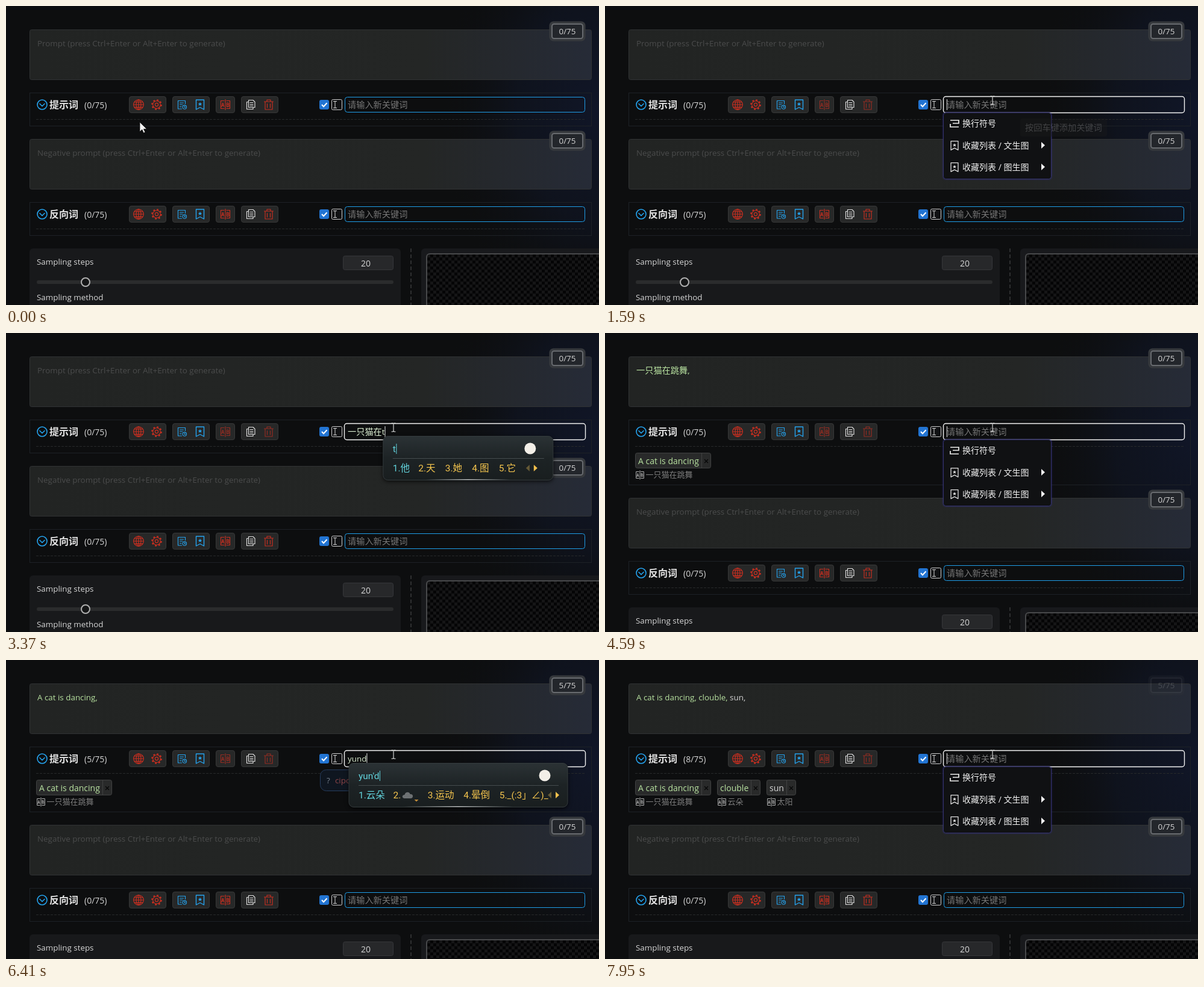
An HTML page for the animation above (8 s loop, 984 by 497 pixels).

```html
<!DOCTYPE html>
<html lang="zh">
<head>
<meta charset="utf-8">
<title>Prompt editor</title>
<style>
html,body{margin:0;width:100%;height:100%;overflow:hidden;background:#0d0e0f}
svg{display:block;width:984px;height:497px}
text{font:13.4px "Open Sans","Noto Sans CJK SC","Noto Sans CJK",sans-serif;fill:#d6d6d6;white-space:pre}
.c{font-size:14.2px;font-family:"Noto Sans CJK SC","Noto Sans CJK",sans-serif}
.hint{fill:#4b4c4c}
.head{font:700 16px "Noto Sans CJK SC","Noto Sans CJK",sans-serif;fill:#e4e4e4}
.n14{font-size:14px}
.mid{text-anchor:middle}
.ph{fill:#777}
.menu{font:14px "Open Sans","Noto Sans CJK SC","Noto Sans CJK",sans-serif;fill:#f2f2f2}
.small{font:13px "Noto Sans CJK SC","Noto Sans CJK",sans-serif;fill:#7d7d7d}
.green,.green .c{fill:#b9e3a1}
.entry,.entry .c{fill:#dcefd2}
.ime{font:15.5px Roboto,"Noto Sans CJK SC","Noto Sans CJK",sans-serif;fill:#f6c64e}
.pin{font:15.4px Roboto,sans-serif;fill:#63d6df}
.area{fill:url(#area);stroke:#313334}
.row{fill:none;stroke:#1d2126}
.dash{stroke:#27292a;stroke-dasharray:4 2}
.btn{fill:#272828;stroke:#373838}
.i{fill:none;stroke:currentColor;stroke-width:1.15;stroke-linejoin:round;stroke-linecap:round}
.red{color:#cb2f20}.blue{color:#25a3ee}.white{color:#dedede}
.dim{opacity:.68}
.off{display:none}
</style>
</head>
<body>
<svg viewBox="0 0 984 497">
<defs>
  <radialGradient id="glow" gradientUnits="userSpaceOnUse" cx="980" cy="170" r="370" gradientTransform="translate(980 170) scale(.72 1) translate(-980 -170)">
    <stop offset="0" stop-color="#141e40" stop-opacity=".5"/><stop offset=".5" stop-color="#121b36" stop-opacity=".36"/><stop offset="1" stop-color="#0d0e0f" stop-opacity="0"/>
  </radialGradient>
  <linearGradient id="area"><stop offset="0" stop-color="#222423"/><stop offset=".7" stop-color="#242625"/><stop offset="1" stop-color="#262b37"/></linearGradient>
  <linearGradient id="glass" x2="0" y2="1"><stop offset="0" stop-color="#2b3235"/><stop offset=".5" stop-color="#1d2325"/><stop offset="1" stop-color="#191e1f"/></linearGradient>
  <linearGradient id="shine"><stop offset="0" stop-color="#fff" stop-opacity="0"/><stop offset=".5" stop-color="#fff" stop-opacity=".75"/><stop offset="1" stop-color="#fff" stop-opacity="0"/></linearGradient>
  <pattern id="check" x="699" y="413" width="10" height="10" patternUnits="userSpaceOnUse"><path fill="#050506" d="M0 0h10v10H0z"/><path fill="#151516" d="M0 0h5v5H0zM5 5h5v5H5z"/></pattern>
  <filter id="shade" x="-10%" y="-20%" width="120%" height="150%" color-interpolation-filters="sRGB"><feDropShadow dx="0" dy="2" stdDeviation="3" flood-color="#000" flood-opacity=".7"/></filter>
  <filter id="aura" x="-10%" y="-10%" width="120%" height="120%" color-interpolation-filters="sRGB"><feDropShadow dx="0" dy="0" stdDeviation="1.5" flood-color="#3b35a8" flood-opacity=".6"/></filter>

  <g id="globe" class="i"><circle r="8.3"/><ellipse rx="4" ry="8.3"/><path d="M0-8.3V8.3M-8.3 0H8.3M-7-4.3H7M-7 4.3H7"/></g>
  <g id="gear" class="i"><circle r="6.3"/><circle r="2.6"/><circle r="7.6" stroke-width="2.4" stroke-dasharray="2.7 3.27" stroke-linecap="butt"/></g>
  <g id="list" class="i"><path d="M5.500-1.500V-6.500H-6.500V7H-.5M-3.500-3H2.500M-3.500 0H1M-3.500 3.500H-1"/><circle cx="4.300" cy="4" r="3.200"/><path d="M4.300 2.500V4.300H5.500"/></g>
  <g id="mark" class="i"><path stroke-width="1.400" d="M-6.500-8H6.500V8L0 4.500-6.500 8Z"/><path d="M0-4.200 1-2H3.200L1.500-.5 2.200 1.800 0 .5-2.200 1.800-1.500-.5-3.200-2H-1Z" fill="currentColor" stroke="none"/></g>
  <g id="ab" class="i"><path d="M-2-6.500H-7.500V6.500H-2M2-6.500H7.500V6.500H2M0-8.500V8.500M-6 3.300-4.200-3-2.400 3.300M-5.500 1.500H-3M2.600-3V3.300H4.500C6.500 3.300 6.300 0 4.500 0H2.600M4.300 0C6.200 0 6-3 4.300-3H2.600"/></g>
  <g id="copy" class="i"><path d="M-3.500-7.500H4L7-4.500V4.500H-3.500ZM-3.500-4.500H-6.500V7.500H4V4.500M-1-3.500H4M-1-.5H4M-1 2H4"/></g>
  <g id="bin" class="i"><path d="M-7.500-5H7.500M-3-5V-8H3V-5M-6-5V8H6V-5M-2.500-1.500V5M2.500-1.500V5"/></g>
  <g id="badge"><rect x="901.500" y="25.500" width="60" height="33" rx="7" fill="#36393d"/><rect x="906" y="30" width="51" height="24" rx="3.500" fill="#23262b" stroke="#686b6f" stroke-width="2"/></g>
</defs>
<path fill="#0d0e0f" d="M0 0h984v497H0z"/><path fill="url(#glow)" d="M0 0h984v497H0z"/>
<g id="top"></g>
<g id="low"></g>
<g id="tags"></g>
<g id="menu">
  <rect x="561.5" y="177.500" width="179" height="110" rx="4" fill="#101113" stroke="#34336f" filter="url(#aura)"/>
  <path d="M573 190H587V195H577M587 201H573V196" fill="none" stroke="#eee" stroke-width="1.700"/>
  <text x="593" y="200" class="menu">换行符号</text>
  <use href="#mark" class="white" transform="translate(580 232) scale(.92)"/><text x="593" y="237" class="menu">收藏列表 / 文生图</text>
  <use href="#mark" class="white" transform="translate(580 268) scale(.92)"/><text x="593" y="273" class="menu">收藏列表 / 图生图</text>
  <path d="M724 226l6 5.500-6 5.500zM724 262l6 5.500-6 5.500z" fill="#f4f4f4"/>
</g>
<g id="tip" opacity="0"><rect x="689" y="187" width="144" height="30" rx="4" fill="#1b1c1d"/><text x="697" y="207" class="c" style="fill:#8d8d8d">按回车键添加关键词</text></g>
<g id="guess"><rect x="521.500" y="182.500" width="190" height="35" rx="10" fill="#0f1620" stroke="#263d5e"/><text x="532" y="205" style="fill:#79838f">?</text><text x="546" y="205" style="fill:#8f4548">cipo</text></g>
<g id="ime">
  <rect id="pane" y="171.500" height="73" rx="8" fill="url(#glass)" stroke="#343b3d" filter="url(#shade)"/>
  <path id="rule" stroke="#454c4e"/><rect id="edge" y="243" height="1.200" fill="url(#shine)"/>
  <circle id="dot" cy="192" r="9.500" fill="#f3efe8"/>
  <text id="pin" class="pin" y="198"></text><path id="pinCaret" stroke="#63d6df"/>
  <g id="cands"></g>
  <path id="prev" d="M-4 0l6-5.500v11z" fill="#665a36"/><path id="next" d="M4 0l-6-5.500v11z" fill="#f3c04c"/>
</g>
<path id="arrow" d="M0 0V16L3.800 12.400 6.300 18 9 17 6.500 11.600H11.600Z" fill="#f4f4f4" stroke="#111" stroke-width=".8"/>
<path id="beam" d="M-3.500-7H-1L0-6 1-7H3.500M0-6V6M-3.500 7H-1L0 6 1 7H3.500" fill="none" stroke="#e8e8e8" stroke-width="1.100"/>
</svg>
<script>
const $ = id => document.getElementById(id);
const rich = s => s.replace(/[\u3000-\u9fff]+/g, m => `<tspan class="c">${m}</tspan>`);
const use = (id, x, y, cls) => `<use href="#${id}" x="${x}" y="${y}" class="${cls}"/>`;
const show = (id, on) => $(id).classList.toggle('off', !on);
const set = (id, attrs) => Object.entries(attrs).forEach(([k, v]) => $(id).setAttribute(k, v));
const at = (id, x, y) => set(id, {transform: `translate(${x} ${y})`});

function section(k, title, hint) {
  const groups = [[204, 62], [276, 62], [348, 32], [390, 62]];
  return `<rect class="area" x="39.5" y="39.5" width="932" height="83" rx="3"/>
  <text id="prompt${k}" class="hint" x="52" y="67">${hint}</text>
  <g id="badge${k}"><use href="#badge"/><text id="count${k}" class="mid" x="931.500" y="47">0/75</text></g>
  <rect id="row${k}" class="row" x="39.5" y="144.500" width="932" height="55"/>
  <path class="dash" d="M50 188.500H962"/>
  <g class="i blue" style="stroke-width:1.600"><circle cx="60" cy="164" r="8"/><path d="M56 162.500l4 4 4-4"/></g>
  <text class="head" x="72" y="170">${title}</text><text id="total${k}" class="n14" x="130" y="169.500">(0/75)</text>
  ${groups.map(([x, w]) => `<rect class="btn" x="${x + .5}" y="150.500" width="${w - 1}" height="27" rx="3.500"/>`).join('')}
  ${use('globe', 220, 164, 'red')}${use('gear', 250, 164, 'red')}${use('list', 292, 164, 'blue')}${use('mark', 322, 164, 'blue')}
  <g id="ab${k}">${use('ab', 364, 164, 'red')}</g>${use('copy', 406, 164, 'white')}<g id="bin${k}">${use('bin', 436, 164, 'red')}</g>
  <rect x="520" y="156" width="16" height="16" rx="3" fill="#2274d2"/><path d="M524 164l3 3.200 5.500-6" fill="none" stroke="#fff" stroke-width="2"/>
  <rect x="540.500" y="155.500" width="17" height="17" rx="2" fill="#101113" stroke="#cfcfcf"/>
  <path d="M543 158.500H549M546 158.500V169.500M543 169.500H549" stroke="#d8d8d8" fill="none"/>
  <rect id="box${k}" x="562.500" y="151.500" width="398" height="25" rx="4" fill="none" stroke="#1f9ee8"/>
  <text id="field${k}" class="ph" x="567" y="169">${rich('请输入新关键词')}</text>
  ${k ? '' : '<path id="caret" stroke="#e8e8e8"/>'}`;
}
const hint = 'Prompt (press Ctrl+Enter or Alt+Enter to generate)';
$('top').innerHTML = section(0, '提示词', hint);
$('low').innerHTML = `<g transform="translate(0 182)">${section(1, '反向词', 'Negative p' + hint.slice(1))}</g>
  <rect x="39" y="403" width="616" height="140" rx="6" fill="#18191b"/>
  <text x="51" y="430">Sampling steps</text><text x="51" y="489">Sampling method</text>
  <rect x="559.5" y="415.500" width="83" height="23" rx="3" fill="#27282a" stroke="#36373a"/><text class="mid n14" x="597" y="433">20</text>
  <rect x="51" y="456" width="592" height="6" rx="3" fill="#2b2c2d"/><circle cx="132" cy="459" r="7" fill="#151617" stroke="#b0b0b0" stroke-width="2"/>
  <path d="M672 403V560" stroke="#3b3c3e" stroke-width="1.500" stroke-dasharray="6 4"/>
  <rect x="689" y="403" width="320" height="140" rx="6" fill="#18191c"/>
  <rect x="698" y="412" width="310" height="140" rx="5" fill="url(#check)" stroke="#48494b" stroke-width="2"/>`;

// State changes in order; each entry is merged over the earlier ones.
const typed = (pin, cand) => ({pin, cand, menu: 0, caret: 1});
const done = text => ({text, pin: '', cand: ''});
const enter = {text: '', pin: '', menu: 1, caret: 1, guess: 0};
const cat = '一只猫在跳舞', en = 'A cat is dancing';
const green = s => `<tspan class="green">${rich(s)}</tspan>`;
const steps = [
  [0, {text: '', pin: '', cand: '', menu: 0, caret: 0, focus: 0, prompt: '', total: 0, tags: [], guess: 0}],
  [1520, {focus: 1, caret: 1}],
  [1590, {menu: 1}],
  [2250, {...typed('y', '一 有 也 与 要'), menu: 1}],
  [2520, typed("yi'zh", '一直 以至 一周 一种 一只')],
  [2590, typed("yi'zhi", '一直 一只 一致 意志 抑制')],
  [2660, typed("yi'zhi'm", '一只猫 一直没 一直 一只 一致')],
  [2730, typed("yi'zhi'mao", '一只猫 一直冒 一直猫 一直 一致')],
  [3010, done('一只猫')],
  [3160, typed('z', '在 这 中 做 总')],
  [3230, typed('zai', '在 再 仔 载 灾')],
  [3300, done('一只猫在')],
  [3370, typed('t', '他 天 她 图 它')],
  [3440, typed('ti', '提 题 体 替 踢')],
  [3510, typed('tiao', '条 跳 调 挑 眺')],
  [3650, typed("tiao'w", '跳舞 条纹 跳 条 调')],
  [3720, typed("tiao'wu", '跳舞 条 跳 调 挑')],
  [3920, done(cat)],
  [4260, {...enter, prompt: green(cat + ','), tags: [[cat, '']]}],
  [4590, {tags: [[en, cat]]}],
  [4860, {prompt: green(en + ','), total: 5, caret: 0}],
  [5260, {caret: 1}],
  [5590, typed('y', '一 有 也 与 要')],
  [5860, typed('yu', '与 于 鱼 雨 语')],
  [6130, {...typed('yun', '云 运 晕 孕 韵'), guess: 1}],
  [6340, typed("yun'd", '云朵 ☁ 运动 晕倒 _(:3」∠)_')],
  [6480, typed("yun'du", '云朵 ☁ 晕 运 韵')],
  [6550, typed("yun'duo", '云朵 ☁ 云 运 晕')],
  [6610, {...done('云朵'), guess: 0}],
  [7010, {...enter, prompt: green(en + ', clouble,'), total: 8, tags: [[en, cat], ['clouble', '云朵']]}],
  [7340, typed('tai', '太 台 抬 泰 态')],
  [7410, typed("tai'y", '太阳 太 台 抬 泰')],
  [7480, typed("tai'yang", '太阳 抬 太 台 泰')],
  [7680, done('太阳')],
  [7820, {...enter, prompt: green(en + ', clouble,') + ' sun,', tags: [[en, cat], ['clouble', '云朵'], ['sun', '太阳', 1]]}]
];

// Linear interpolation over [time, value...] points.
function track(points, t, i = 1) {
  const n = points.findIndex(p => p[0] > t);
  if (n < 0) return points[points.length - 1][i];
  if (!n) return points[0][i];
  const a = points[n - 1], b = points[n];
  return a[i] + (b[i] - a[i]) * (t - a[0]) / (b[0] - a[0]);
}
const mouse = [[70, 222, 193], [300, 244, 172], [600, 380, 162], [850, 478, 160], [1380, 478, 160], [1520, 643, 157]];
const tipFade = [[1400, 0], [1500, .5], [1590, .4], [1790, 0]];
const badgeFade = [[5590, 1], [5860, .2], [6340, 1], [7680, 1], [7950, .2]];

function drawTags(tags) {
  const box = $('tags');
  box.innerHTML = '';
  let x = 50;
  for (const [name, local, fresh] of tags) {
    const g = document.createElementNS('http://www.w3.org/2000/svg', 'g');
    box.append(g);
    g.innerHTML = `<text class="n14 ${fresh ? '' : 'green'}" x="${x + 5}" y="218">${rich(name)}</text>`;
    const w = Math.round(g.firstChild.getComputedTextLength() + 25);
    const r = x + w;
    g.insertAdjacentHTML('afterbegin', `<rect x="${x + .5}" y="199.500" width="${w - 1}" height="25" rx="3" fill="#292a2a" stroke="#414242"/>
      <path d="M${r - 15.5} 200V224" stroke="#414242"/><path d="M${r - 11} 210l6 6m0-6l-6 6" stroke="#090909" stroke-width="1.500"/>`);
    if (local) g.insertAdjacentHTML('beforeend', `<use href="#ab" transform="translate(${x + 8} 236) scale(.85)" style="color:#b5b5b5"/>
      <text class="small" x="${x + 17.500}" y="240">${local}</text>`);
    x = r + 10;
  }
}

function drawIme(s) {
  show('ime', s.pin);
  if (!s.pin) return;
  const x = 569 + s.text.length * 14.2;
  let pos = x + 16, end = 0, out = '';
  s.cand.split(' ').forEach((word, i) => {
    const cloud = word === '☁';
    const n = word[0] === '_' ? 3.35 : cloud ? 1.85 : word.length;
    const tone = i ? '' : 'style="fill:#63d6df"';
    out += `<text class="ime" x="${pos}" y="230" ${tone}>${i + 1}.${cloud ? '' : word}</text>`;
    if (cloud) out += `<path transform="translate(${pos + 15} 230)" d="M4 0C-1 0-1-6 4-6 5-12 13-11 13-7 19-8 19 0 14 0Z" fill="#6d7173"/><path transform="translate(${pos + 35} 232)" d="M0 0h7l-3.500 3.500z" fill="#c08a38"/>`;
    end = pos + 15 + 15 * n;
    pos = end + (i ? 14.5 : 12.5);
  });
  $('cands').innerHTML = out;
  const w = Math.max(282, end + 48 - x), r = x + w;
  set('pane', {x, width: w});
  set('edge', {x: x + w * .25, width: w * .5});
  set('rule', {d: `M${x + 16} 208.500H${r - 15}`});
  set('dot', {cx: r - 38});
  set('pin', {x: x + 16});
  $('pin').textContent = s.pin;
  const c = x + 17 + $('pin').getComputedTextLength();
  set('pinCaret', {d: `M${c} 184V201`});
  at('prev', end + 19, 224.5);
  at('next', end + 30, 224.5);
}

function drawState(s) {
  const raw = s.text + s.pin.replace(/'/g, '');
  const field = $('field0');
  field.innerHTML = rich(raw || '请输入新关键词');
  field.setAttribute('class', raw ? 'entry' : 'ph');
  const cx = raw ? 567.5 + field.getComputedTextLength() : 567.5;
  set('caret', {d: `M${cx} 155V173`});
  show('caret', s.caret);
  set('box0', s.focus
    ? {x: 561.5, y: 150.5, width: 400, height: 27, stroke: '#f2f2f2', 'stroke-width': 1.4}
    : {x: 562.5, y: 151.5, width: 398, height: 25, stroke: '#1f9ee8', 'stroke-width': 1});
  for (const id of ['ab0', 'bin0']) $(id).classList.toggle('dim', s.focus);
  show('menu', s.menu);
  show('guess', s.guess);
  $('prompt0').innerHTML = s.prompt || hint;
  $('prompt0').setAttribute('class', s.prompt ? '' : 'hint');
  $('total0').textContent = `(${s.total}/75)`;
  const grow = s.tags.length ? 53 : 0;
  at('low', 0, grow);
  set('row0', {height: 55 + grow});
  drawTags(s.tags);
  drawIme(s);
}

let last = -1;
const start = performance.now();
function frame(now) {
  const t = Math.max(0, now - start) % 8000;
  const n = steps.filter(e => e[0] <= t).length;
  if (n !== last) {
    last = n;
    drawState(Object.assign({}, ...steps.slice(0, n).map(e => e[1])));
  }
  const x = track(mouse, t, 1), y = track(mouse, t, 2);
  at('arrow', x, y);
  at('beam', x, y);
  show('arrow', x < 561);
  show('beam', x >= 561);
  set('tip', {opacity: track(tipFade, t)});
  set('badge0', {opacity: track(badgeFade, t)});
  $('count0').textContent = t < 5860 ? '0/75' : '5/75';
  requestAnimationFrame(frame);
}
frame(start);
</script>
</body>
</html>
```
